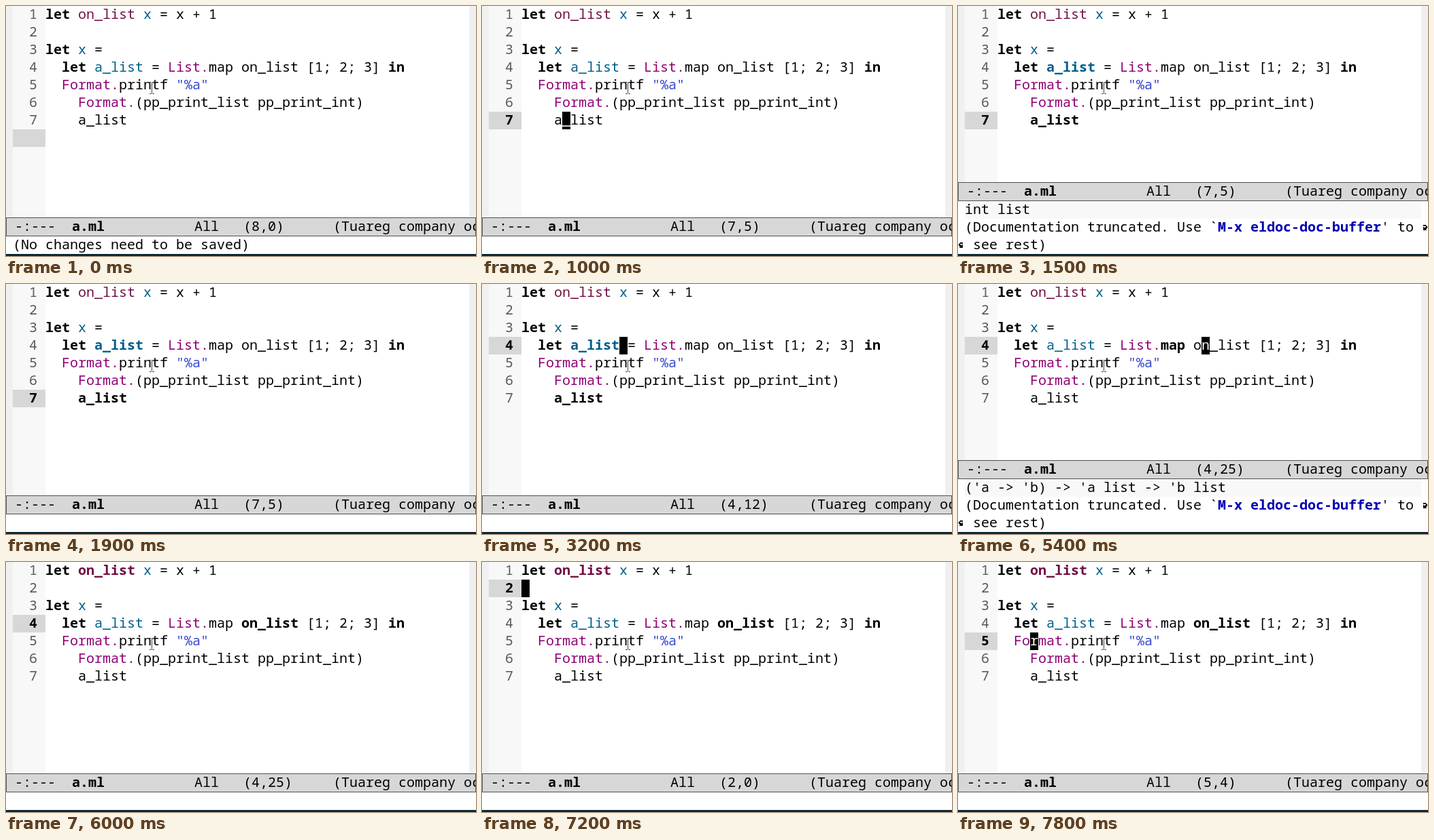
Recreate the animation shown at these times as an HTML page. Size 691x369 px, loop 8 s.

```html
<!DOCTYPE html>
<html lang="en">
<head>
<meta charset="utf-8">
<title>Editor session</title>
<style>
  html, body { margin: 0; width: 100%; height: 100%; overflow: hidden; background: #fff; }
  #stage {
    position: relative; width: 691px; height: 369px; overflow: hidden; color: #000;
    font: 20px/23px "Noto Sans Mono", monospace; font-variant-ligatures: none;
  }
  #stage div, svg { position: absolute; }
  .row { left: 0; height: 26px; white-space: pre; }
  .fringe { top: 0; width: 10px; height: 312px; background: #f0f0f0; }
  #gutter { left: 10px; top: 0; width: 48px; height: 312px; background: #f8f8f8; }
  #gutter .row { width: 36px; padding-right: 12px; text-align: right; color: #595959; }
  #gutter .current { background: #d7d7d7; color: #000; font-weight: 700; }
  #code { left: 58px; top: 0; }
  #cursor { width: 12px; height: 26px; overflow: hidden; background: #000; }
  #stage #cursor * { color: #fff; }
  #bottom { left: 0; width: 691px; height: 160px; background: #fff; }
  #mode {
    left: 0; top: 0; width: 689px; height: 26px; overflow: hidden; white-space: pre;
    background: #d7d7d7; border: 1px solid #505050;
  }
  #echo { left: 0; top: 28px; width: 691px; }
  #echo .row { left: 10px; width: 671px; }
  .type { background: #f8f8f8; }
  #echo b { color: #0000b0; }
  #strip { left: 0; top: 366px; width: 691px; height: 3px; background: #0b2733; }
  i { font-style: normal; }
  .fun { color: #721045; }
  .var { color: #005e8b; }
  .mod { color: #8f0075; }
  .str { color: #3548cf; }
  [data-symbol=a_list] .a_list, [data-symbol=map] .map,
  [data-symbol=on_list] .on_list { font-weight: 700; }
</style>
</head>
<body>
<div id="stage">
  <div class="fringe" style="left:0"></div>
  <div class="fringe" style="left:681px"></div>
  <div id="gutter"></div>
  <div id="code"></div>
  <div id="cursor"><div class="row"></div></div>
  <svg width="10" height="20" style="left:209px;top:111px" fill="none" stroke="#444">
    <path d="M2 1.5h2.5l1 1 1-1H9M5.5 2.5v15M2 18.5h2.5l1-1 1 1H9"/>
  </svg>
  <div id="bottom"><div id="mode"></div><div id="echo"></div></div>
  <div id="strip"></div>
</div>
<script>
const ROW = 26, COL = 12, LOOP = 8000;
const $ = id => document.getElementById(id);

const lines = [
  '<b>let</b> <i class="fun on_list">on_list</i> <i class="var">x</i> = x + 1',
  '',
  '<b>let</b> <i class="var">x</i> =',
  '  <b>let</b> <i class="var a_list">a_list</i> = <i class="mod">List.</i><i class="map">map</i> ' +
    '<i class="on_list">on_list</i> [1; 2; 3] <b>in</b>',
  '  <i class="mod">Format.</i>printf <i class="str">"%a"</i>',
  '    <i class="mod">Format.</i>(pp_print_list pp_print_int)',
  '    <i class="a_list">a_list</i>',
  ''
];

const row = (html, index, cls = '') =>
  `<div class="row ${cls}" style="top:${index * ROW}px">${html}</div>`;

const wrapArrow = (x, y, flip) =>
  `<svg width="8" height="8" style="left:${x}px;top:${y}px;transform:scaleX(${flip})">` +
  '<path d="M2 0H6V1H7V2H8V5H7V6H6V7H7V8H2V3H3V4H5V3H6V2H2z"/></svg>';

const typeInfo = type => [
  row(type, 0, 'type'),
  row("(Documentation truncated. Use `<b>M-x eldoc-doc-buffer</b>' to", 1) + wrapArrow(682, 35, 1),
  row(' see rest)', 2) + wrapArrow(1, 61, -1)
];

const saved = [row('(No changes need to be saved)', 0)];
const mapInfo = typeInfo("('a -> 'b) -> 'a list -> 'b list");

// Each step overrides only what changes: line, col, cursor visibility, symbol, echo rows.
const steps = [
  [0,    { line: 8, col: 0, on: false, symbol: '', echo: saved }],
  [300,  { line: 7, on: true, echo: [] }],
  [800,  { on: false }],
  [1000, { col: 5, on: true }],
  [1500, { on: false, symbol: 'a_list', echo: typeInfo('int list') }],
  [1900, { echo: [] }],
  [2000, { line: 4, col: 6, on: true }],
  [2500, { on: false }],
  [3000, { col: 7, on: true }],
  [3200, { col: 12 }],
  [3400, { col: 19 }],
  [3600, { col: 23 }],
  [3900, { col: 20 }],
  [4400, { on: false, symbol: 'map', echo: mapInfo }],
  [4800, { col: 23, on: true }],
  [5100, { col: 24 }],
  [5400, { col: 25 }],
  [5900, { on: false, symbol: 'on_list', echo: typeInfo('int -> int') }],
  [6000, { echo: [] }],
  [6100, { line: 1, col: 4, on: true }],
  [6600, { on: false }],
  [7100, { on: true }],
  [7200, { line: 2, col: 0 }],
  [7400, { line: 3, col: 4 }],
  [7500, { line: 4 }],
  [7700, { line: 5 }]
];

$('code').innerHTML = lines.map((html, i) => row(html, i)).join('');
$('gutter').innerHTML = lines.map((_, i) => row(i < 7 ? i + 1 : '', i)).join('');

function show({ line, col, on, symbol, echo }) {
  $('stage').dataset.symbol = symbol;
  [...$('gutter').children].forEach((el, i) => el.classList.toggle('current', i === line - 1));

  const cursor = $('cursor'), text = cursor.firstElementChild;
  cursor.style.display = on ? '' : 'none';
  cursor.style.left = 58 + col * COL + 'px';
  cursor.style.top = (line - 1) * ROW + 'px';
  text.innerHTML = lines[line - 1];
  text.style.left = -col * COL + 'px';

  $('bottom').style.top = 338 - Math.max(echo.length, 1) * ROW + 'px';
  $('mode').innerHTML = ' -:---  <b>a.ml</b>' + ' '.repeat(11) + 'All   ' +
    `(${line},${col})`.padEnd(11) + '(Tuareg company oc';
  $('echo').innerHTML = echo.join('');
}

let start, shown = -1;
function frame(now) {
  start ??= now;
  const time = (now - start) % LOOP;
  const index = steps.findLastIndex(([at]) => at <= time);
  if (index !== shown) {
    show(Object.assign({}, ...steps.slice(0, index + 1).map(step => step[1])));
    shown = index;
  }
  requestAnimationFrame(frame);
}
requestAnimationFrame(frame);
</script>
</body>
</html>
```
